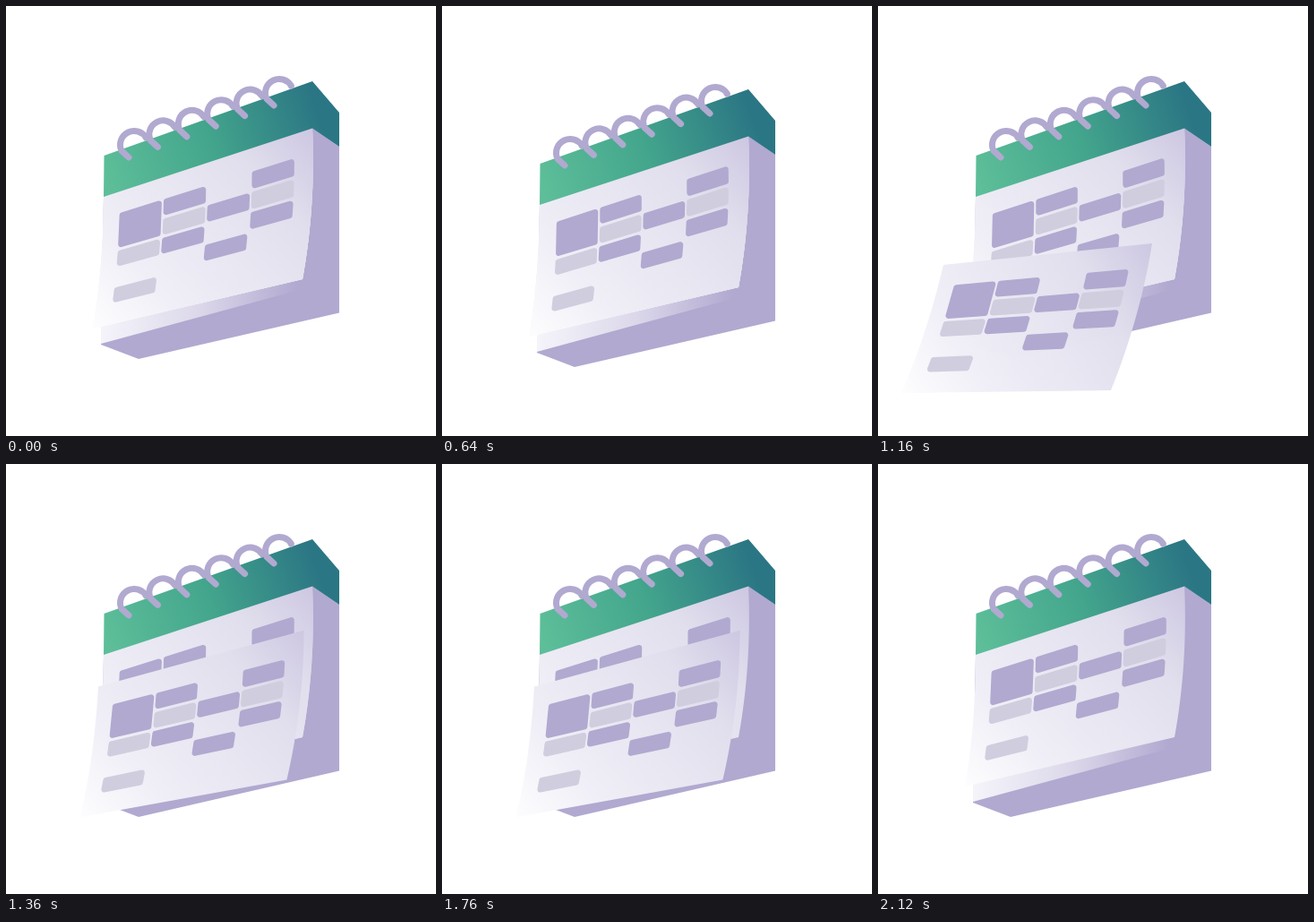
Animation, 480 px wide and 480 px high, one loop 2.52 s. Source, as an HTML page with a canvas:

```html
<!DOCTYPE html>
<html lang="en">
<head>
<meta charset="utf-8">
<title>Calendar</title>
<style>
  html, body { margin: 0; width: 100%; height: 100%; overflow: hidden; background: #fff; }
  canvas { display: block; width: 480px; height: 480px; }
</style>
</head>
<body>
<canvas id="stage" width="480" height="480"></canvas>
<script>
const ctx = document.getElementById('stage').getContext('2d');
const LOOP = 2520, SHEETS = 3, FIRST_FALL = 775, INTERVAL = 400, FALL = 385, FADE = 160;
const LILAC = '#b1a9d0', PALE = '#d0cddf';

// One string per column, top to bottom: D tall, d dark, l light
const GRID = ['D l l', 'dld', ' d d', 'dld'];

const clamp = x => Math.min(1, Math.max(0, x));
const ease = x => (1 - Math.cos(Math.PI * clamp(x))) / 2;

function gradient(from, to, ...colors) {
  const g = ctx.createLinearGradient(...from, ...to);
  colors.forEach((color, i) => g.addColorStop(i / (colors.length - 1), color));
  return g;
}

function polygon(fill, points) {
  ctx.fillStyle = fill;
  ctx.beginPath();
  points.forEach(p => ctx.lineTo(...p));
  ctx.fill();
}

function roundedQuad(fill, q) {
  ctx.fillStyle = fill;
  ctx.beginPath();
  ctx.moveTo((q[0][0] + q[3][0]) / 2, (q[0][1] + q[3][1]) / 2);
  q.forEach((p, i) => ctx.arcTo(...p, ...q[(i + 1) % 4], 3));
  ctx.closePath();
  ctx.fill();
}

// Place on a sheet (u across, v down): it slides by s, then turns flat late in the fall.
function sheetPoint(u, v, s) {
  const turn = s ** 4;
  return [
    109 - 12 * v * v + u * (233 + 8 * v - 7 * v * v)
      - (10 + 15 * v + 8 * u) * s - (26 + 20 * v - 8 * u) * turn,
    212 + 156 * v - 8 * v * v - u * (76 - 16 * v - 5 * v * v)
      + (77 + 25 * u - 5 * v) * s + 27 * u * turn
  ];
}

function drawSheet(s = 0, bend = 0, alpha = 1) {
  const outline = [];
  for (let v = 0; v <= 1; v += 1 / 16) {
    outline.push(sheetPoint(1, v, s));
    outline.unshift(sheetPoint(0, v, s));
  }
  ctx.globalAlpha = alpha;
  polygon(gradient(sheetPoint(1, 0, s), sheetPoint(0, 1, s),
    '#cdc7e2', '#e1dfed', '#e8e7f2', '#f0eff7', '#fdfdfe'), outline);

  const cell = (u, v) => {
    const [x, y] = sheetPoint(u, v, s);
    return [x + bend * (1 + 3 * v - 4 * u), y + bend * (1 - 2 * u)];
  };
  GRID.forEach((column, c) => [...column].forEach((kind, r) => {
    if (kind === ' ') return;
    const left = .077 + .2105 * c, right = left + .202;
    const top = .16 + .1385 * r, bottom = top + (kind === 'D' ? .256 : .118);
    roundedQuad(kind === 'l' ? PALE : LILAC,
      [cell(left, top), cell(right, top), cell(right, bottom), cell(left, bottom)]);
  }));
  ctx.globalAlpha = 1;
}

function drawBlock() {
  polygon(LILAC, [[109, 212], [342, 136], [372, 157], [372, 342.5], [148, 394], [106, 378]]);
  polygon(gradient([106, 0], [325, 0], '#f5f4fa', '#dcd8ea', LILAC),
    [[106, 350], [331, 300], [331, 316], [106, 377]]);
}

function drawHeader() {
  polygon(gradient([110, 190], [345, 110], '#5dbe99', '#43a58c', '#2b7684'),
    [[109.5, 167], [342, 84], [372, 119], [372, 157], [342, 136.5], [109, 213]]);
  ctx.strokeStyle = LILAC;
  ctx.lineWidth = 7;
  ctx.lineCap = 'round';
  for (let i = 0; i < 6; i++) {
    const x = 137 + 32.4 * i, y = 169 - 11.6 * i;
    ctx.beginPath();
    ctx.moveTo(x, y);
    ctx.arc(x + 6, y - 14, 15.5, 2.7, 5.75);
    ctx.stroke();
  }
}

function draw(t) {
  const sink = ease((t - 110) / 530);
  ctx.clearRect(0, 0, 480, 480);
  ctx.save();
  ctx.translate(0, 9 * (sink - ease((t - 640) / 400)));
  drawBlock();
  drawSheet();
  for (let i = SHEETS - 1; i >= 0; i--) {
    const age = t - FIRST_FALL - INTERVAL * i, fall = Math.max(0, age / FALL);
    if (age >= FALL + FADE) continue;
    const windUp = i ? ease((age + 240) / 200) : sink;
    drawSheet(.85 * ease(fall) + .15 * fall,
      windUp * (1 - clamp(3 * fall)),
      1 - clamp((age - FALL) / FADE));
  }
  drawHeader();
  ctx.restore();
}

const start = performance.now();
function tick() {
  draw((performance.now() - start) % LOOP);
  requestAnimationFrame(tick);
}
tick();
</script>
</body>
</html>
```
